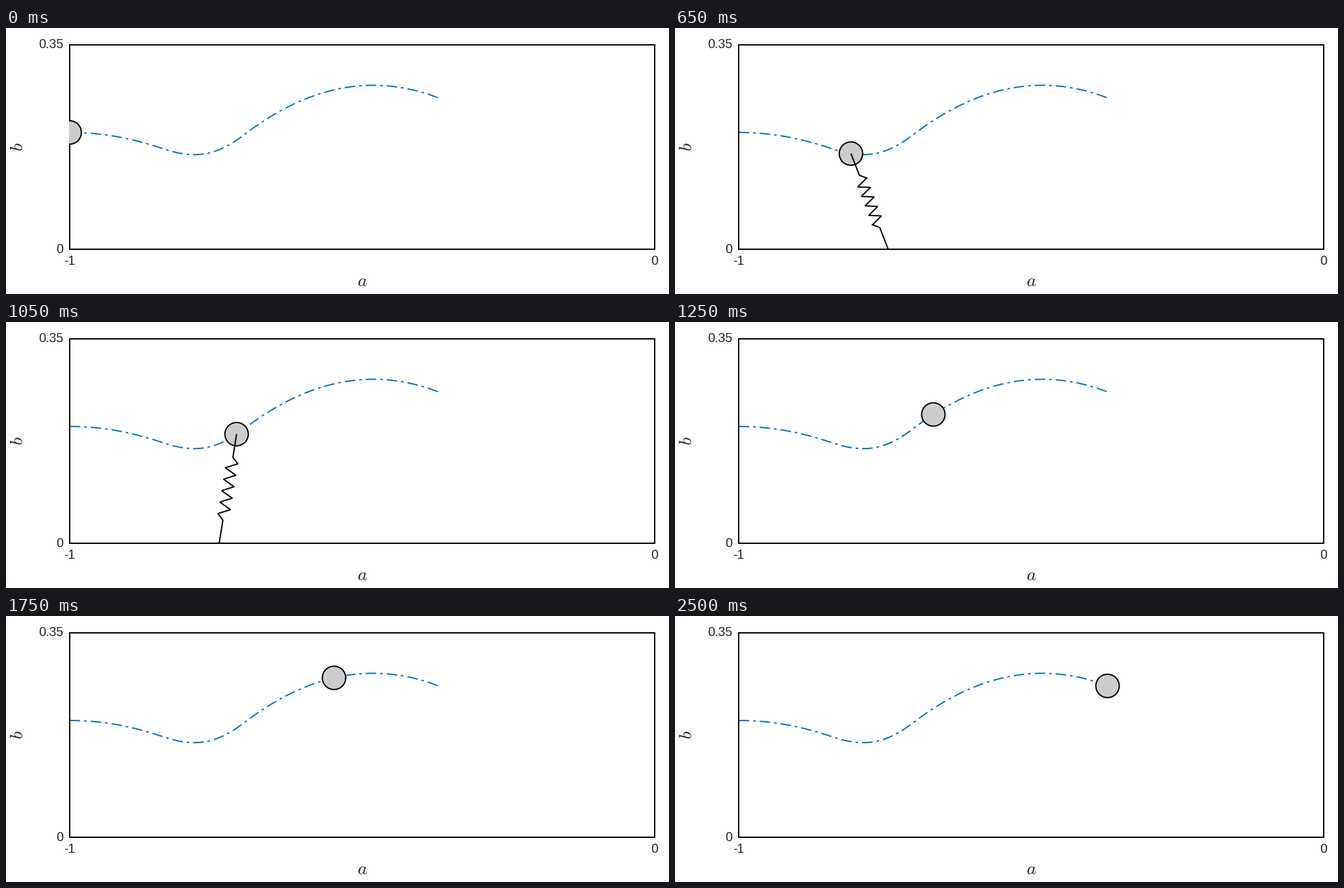
A matplotlib script that plays this animation: 1020x410 px, repeating every 2.55 s.

```python
import numpy as np
import matplotlib.pyplot as plt
from matplotlib.animation import FuncAnimation
from matplotlib.patches import Circle, Rectangle

WIDTH, HEIGHT, DPI = 1020, 410, 80
FRAMES, INTERVAL = 51, 50
LEFT, RIGHT, TOP, BOTTOM = 98, 998, 26, 341

# Hopper in pixels and frames, y pointing down
GRAVITY = np.array([0, 0.444])
START, START_V = np.array([98, 161]), np.array([13.47, 0])
APEX, APEX_V, APEX_TIME = np.array([565, 88.3]), np.array([10.72, 0]), 40.63
FOOT = np.array([328, 341])
TOUCHDOWN, LIFTOFF = 10.39, 22.13
LEG_FORCE = 1.58


def pt(px):
    return px * 72 / DPI


def flight(t, origin, velocity):
    """Position, velocity and acceleration of a ballistic arc."""
    return origin + velocity * t + GRAVITY * t * t / 2, velocity + GRAVITY * t, GRAVITY


def with_leg(state):
    pos, vel, acc = state
    leg = pos - FOOT
    return pos, vel, acc + LEG_FORCE * leg / np.hypot(*leg)


def stance(t):
    """Quintic that joins the two flights while the leg pushes."""
    p0, v0, a0 = with_leg(flight(TOUCHDOWN, START, START_V))
    p1, v1, a1 = with_leg(flight(LIFTOFF - APEX_TIME, APEX, APEX_V))
    span = LIFTOFF - TOUCHDOWN
    t = t - TOUCHDOWN
    s = t / span
    d = p1 - p0 - v0 * span - a0 * span**2 / 2
    e = (v1 - v0 - a0 * span) * span
    f = (a1 - a0) * span**2
    return (p0 + v0 * t + a0 * t * t / 2 + (10 * d - 4 * e + f / 2) * s**3
            + (7 * e - 15 * d - f) * s**4 + (6 * d - 3 * e + f / 2) * s**5)


def in_stance(t):
    return TOUCHDOWN < t < LIFTOFF


def body(t):
    if in_stance(t):
        return stance(t)
    if t <= TOUCHDOWN:
        return flight(t, START, START_V)[0]
    return flight(t - APEX_TIME, APEX, APEX_V)[0]


def spring_points(top, foot, straight=36, amplitude=9, bends=10):
    length = np.hypot(*(foot - top))
    along = (foot - top) / length
    across = np.array([along[1], -along[0]])
    distance = np.r_[0, np.linspace(straight, length - straight, bends + 2), length]
    offset = np.zeros(bends + 4)
    offset[2:-2] = amplitude * (-1.0) ** np.arange(bends)
    return (top + np.outer(distance, along) + np.outer(offset, across)).T


plt.rcParams["mathtext.fontset"] = "cm"
fig = plt.figure(figsize=(WIDTH / DPI, HEIGHT / DPI), dpi=DPI, facecolor="white")
ax = fig.add_axes([0, 0, 1, 1])
ax.set(xlim=(0, WIDTH), ylim=(HEIGHT, 0))
ax.axis("off")

ax.add_patch(Rectangle((LEFT, TOP), RIGHT - LEFT, BOTTOM - TOP, fill=False,
                       ec="black", lw=pt(2), zorder=2))

path = np.array([body(t) for t in np.linspace(0, FRAMES - 1, 501)])
ax.plot(*path.T, color="#0072BD", lw=pt(2), zorder=1, dash_capstyle="butt",
        linestyle=(0, (8.08, 3.03, 2.02, 3.03)))

for x, y, label, align in [(88.5, 31, "0.35", "right"), (88.5, 347, "0", "right"),
                           (97.5, 365, "-1", "center"), (998, 365, "0", "center")]:
    ax.text(x, y, label, ha=align, va="baseline", family="Liberation Sans",
            size=pt(19.6), color="#262626")
ax.text(548, 398, "$a$", ha="center", va="baseline", size=pt(28), color="#262626")
ax.text(32, 183, "$b$", ha="right", va="center", rotation=90, size=pt(28),
        color="#262626")

ball = ax.add_patch(Circle(START, 18, fc="#cccccc", ec="black", lw=pt(2), zorder=3))
ball.set_clip_path(Rectangle((LEFT - 1, TOP), RIGHT - LEFT, BOTTOM - TOP,
                             transform=ax.transData))
spring, = ax.plot([], [], color="black", lw=pt(2), zorder=4,
                  solid_joinstyle="miter", solid_capstyle="butt")


def update(frame):
    pos = body(frame)
    ball.center = pos
    if in_stance(frame):
        spring.set_data(*spring_points(pos, FOOT))
    else:
        spring.set_data([], [])
    return ball, spring


anim = FuncAnimation(fig, update, frames=FRAMES, interval=INTERVAL,
                     repeat=True, repeat_delay=0)
plt.show()
```
